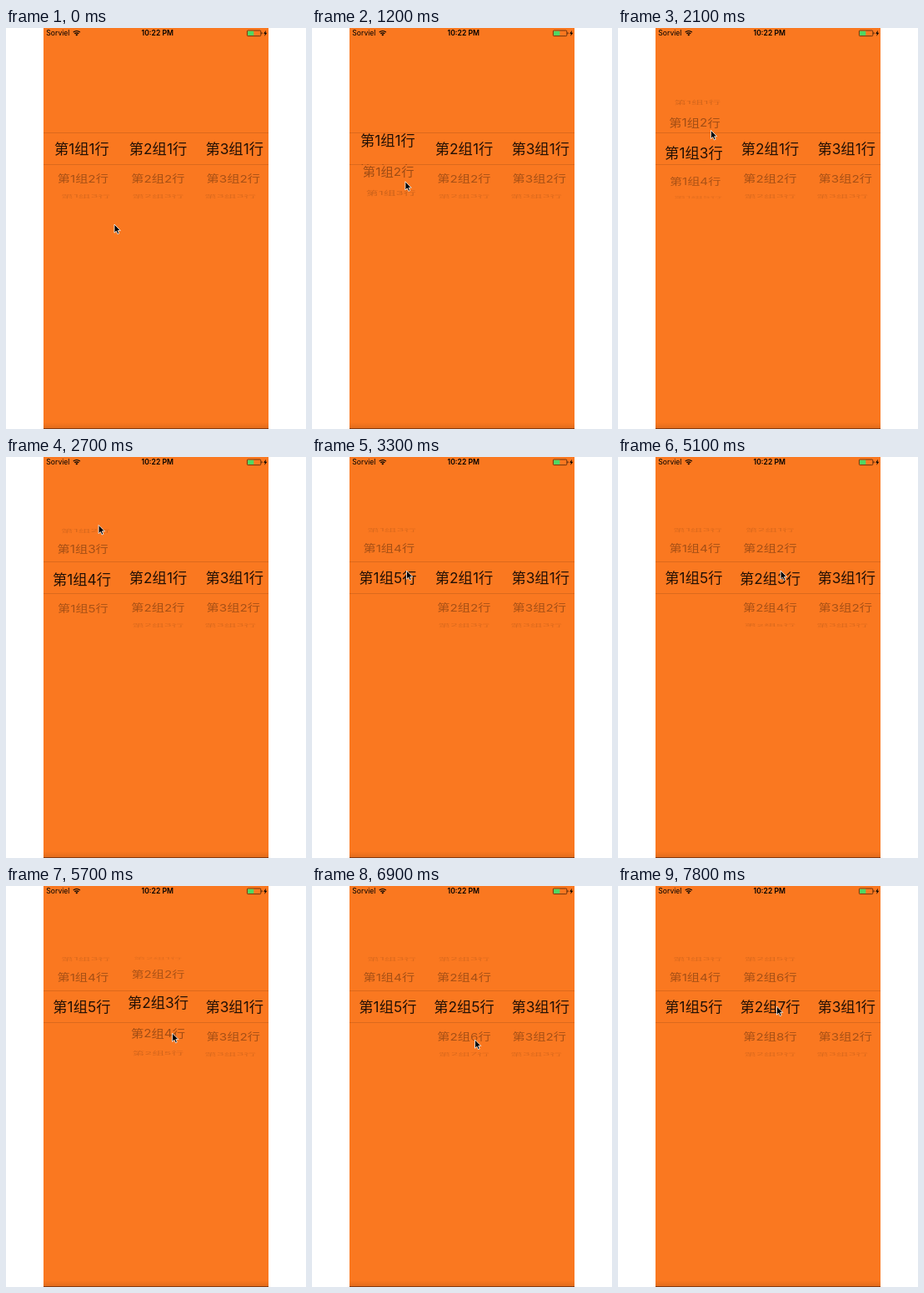
An HTML page for the animation above (8 s loop, 360 by 480 pixels).

```html
<!DOCTYPE html>
<html lang="zh-CN">
<head>
<meta charset="utf-8">
<title>Picker</title>
<style>
  html, body { margin: 0; width: 100%; height: 100%; overflow: hidden; background: #fff; }
  svg { display: block; width: 360px; height: 480px; }
  text { font-family: Inter, "Noto Sans CJK SC", "Noto Sans CJK", sans-serif; fill: #000; }
  .row { font-size: 17.3px; text-anchor: middle; }
  .bright .row { fill: #221005; }
  .status { font-size: 8.64px; }
  .time { font-weight: 600; text-anchor: middle; }
</style>
</head>
<body>
<svg viewBox="0 0 360 480">
  <defs>
    <clipPath id="band"><rect x="45" y="125.5" width="270" height="38"/></clipPath>
    <clipPath id="rest"><path d="M45 80H315V125.5H45ZM45 163.5H315V210H45Z"/></clipPath>
    <linearGradient id="edge" x2="0" y2="1">
      <stop offset="0" stop-color="#5a2500" stop-opacity="0"/>
      <stop offset="1" stop-color="#5a2500" stop-opacity=".14"/>
    </linearGradient>
  </defs>
  <rect x="45" width="270" height="480" fill="#fa7820"/>
  <rect x="45" y="472" width="270" height="7" fill="url(#edge)"/>
  <rect x="45" y="479" width="270" height="1" fill="#84390f"/>

  <text class="status" x="48.3" y="9.3">Sorviel</text>
  <g fill="none" stroke="#000" stroke-width="1.2">
    <path d="M80.7 5.2a5.8 5.8 0 0 1 8.2 0M82.3 6.9a3.5 3.5 0 0 1 5 0"/>
    <path d="M84.8 9.5l-1.5-1.5a2.1 2.1 0 0 1 3 0z" fill="#000" stroke="none"/>
  </g>
  <text class="status time" x="181.8" y="9.3">10:22 PM</text>
  <rect x="289.4" y="3" width="16.4" height="6.6" rx="1" fill="none" stroke="#3a1c08" stroke-width=".7"/>
  <rect x="290.1" y="3.7" width="7.2" height="5.2" fill="#4cd964"/>
  <path d="M306.5 5.1q1.2 .2 1.2 1.2t-1.2 1.2z" fill="#3a1c08"/>
  <path d="M312 2.8l-2.9 4h1.8l-.6 3 3-4.1h-1.9z"/>

  <path d="M45 125.5H315M45 163.5H315" stroke="#000" stroke-opacity=".12"/>
  <g class="dim" clip-path="url(#rest)"></g>
  <g class="bright" clip-path="url(#band)"></g>
  <path id="cursor" d="M0 0V10.2L2.3 8.1L3.9 11.6L5.7 10.8L4.2 7.4H7.3Z"
        stroke="#fff" stroke-width=".8" stroke-linejoin="round"/>
</svg>
<script>
const LOOP = 8000, STEP = 300;
const MID_X = 180, MID_Y = 144.7, RADIUS = 59.6, PITCH = 36.6 * Math.PI / 180;
const ROW = RADIUS * PITCH;
const SHRINK = 0.895, DEPTH = 0.08, BASELINE = 6.5;

// Pointer stops; "drag" names the column pulled on the way to the next stop.
const stops = [
  { at: 0, x: 130, y: 235 },
  { at: 3.5, x: 112, y: 194, drag: 1 },
  { at: 10, x: 111, y: 61 },
  { at: 11, x: 113.5, y: 136 },
  { at: 13.8, x: 191, y: 178, drag: 2 },
  { at: 16.2, x: 193, y: 116 },
  { at: 18.8, x: 200, y: 181, drag: 2 },
  { at: 21.6, x: 195, y: 114 },
  { at: 23, x: 195.5, y: 184, drag: 2 },
  { at: 24.8, x: 192, y: 114 },
  { at: 26, x: 190.5, y: 144 }
];
const legs = stops.slice(1).map((to, i) => ({ from: stops[i], to }));

const clamp = v => Math.min(1, Math.max(0, v));
const easeOut = f => 1 - (1 - f) ** 2;
const mix = (a, b, f) => a + (b - a) * f;
const progress = ({ from, to }, s) => clamp((s - from.at) / (to.at - from.at));

function pointerAt(s) {
  const leg = legs.find(l => s <= l.to.at), f = progress(leg, s);
  return [mix(leg.from.x, leg.to.x, f), mix(leg.from.y, leg.to.y, f)];
}

// Rows follow the pointer, then glide on to the next whole row.
function scrollAt(column, s) {
  let pos = 0;
  for (const leg of legs) {
    if (leg.from.drag !== column) continue;
    const pull = (leg.from.y - leg.to.y) / ROW;
    const glide = easeOut(clamp(s - leg.to.at));
    pos += pull * progress(leg, s) + (Math.ceil(pull) - pull) * glide;
  }
  return pos;
}

function addText(layer, label) {
  const el = document.createElementNS("http://www.w3.org/2000/svg", "text");
  el.setAttribute("class", "row");
  el.setAttribute("y", BASELINE);
  el.textContent = label;
  document.querySelector(layer).append(el);
  return el;
}

function makeColumn(n, x, count) {
  const rows = Array.from({ length: count }, (_, i) => {
    const label = `第${n}组${i + 1}行`;
    return { dim: addText(".dim", label), bright: addText(".bright", label) };
  });
  return { n, x, rows };
}

const columns = [makeColumn(1, 90.9, 5), makeColumn(2, 182.5, 9), makeColumn(3, 274.2, 3)];
const cursor = document.getElementById("cursor");

function place(el, x, y, sx, sy) {
  el.setAttribute("transform", `translate(${x} ${y}) scale(${sx} ${sy})`);
}

function drawColumn({ n, x, rows }, s) {
  const pos = scrollAt(n, s);
  rows.forEach(({ dim, bright }, i) => {
    const angle = (i - pos) * PITCH, cos = Math.cos(angle);
    const shown = Math.abs(angle) < 1.5;
    dim.style.display = bright.style.display = shown ? "" : "none";
    if (!shown) return;
    const y = MID_Y + RADIUS * Math.sin(angle);
    const far = 1 / (1 + DEPTH * (1 - cos)), size = SHRINK * far;
    place(bright, x, y, 1, cos);
    place(dim, MID_X + (x - MID_X) * far, y, size, size * cos);
    dim.style.opacity = 0.42 * cos;
  });
}

function draw(now) {
  const s = Math.floor(now % LOOP / STEP);
  columns.forEach(c => drawColumn(c, s));
  place(cursor, ...pointerAt(s), 1, 1);
}

const start = performance.now();
function tick() {
  draw(performance.now() - start);
  requestAnimationFrame(tick);
}
tick();
</script>
</body>
</html>
```
